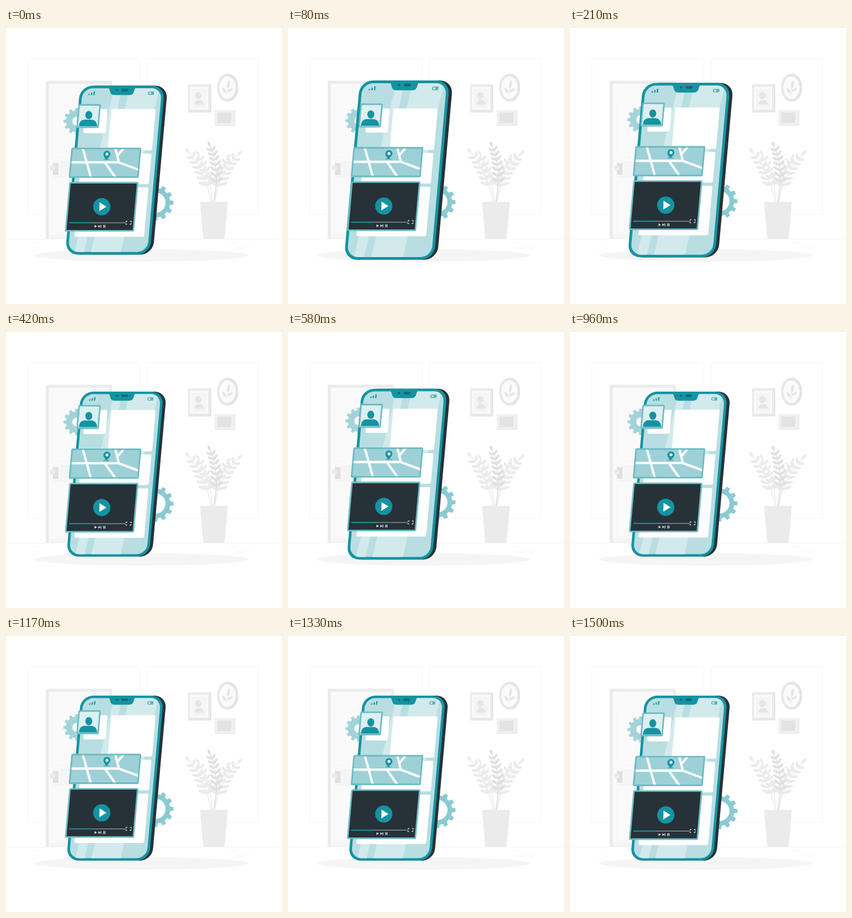
These frames come from a looping animation (500 by 500 pixels, 1.54 s). An HTML page:

```html
<!DOCTYPE html>
<html lang="en">
<head>
<meta charset="utf-8">
<title>Phone with floating panels</title>
<style>
html, body { margin: 0; width: 100%; height: 100%; overflow: hidden; background: #fff; }
svg { display: block; width: 100vw; height: 100vh; }
</style>
</head>
<body>
<svg viewBox="0 0 500 500">
  <defs>
    <clipPath id="screen"><rect x="127.3" y="112.6" width="140.4" height="289.8" rx="18"/></clipPath>
    <clipPath id="mapArea"><rect x="116.3" y="218.2" width="124" height="52" rx="2"/></clipPath>
  </defs>

  <!-- room -->
  <g fill="#fff" stroke="#f5f5f5">
    <rect x="39.5" y="55.5" width="203" height="282" rx="3"/>
    <rect x="255.5" y="55.5" width="202" height="282" rx="3"/>
    <path d="M0 382.5H500M401 389.5h15M417 398.5h31M52 389.5h10"/>
  </g>
  <path d="M72 95.500H192V382H72Z" fill="#ebebeb"/>
  <path d="M77 100.500H187V382H77Z" fill="#f5f5f5"/>
  <path d="M78 101H186V375H78Z" fill="#fafafa"/>
  <path d="M85 132v-10q0-14 14-14h66q14 0 14 14v10ZM85 138h94v96h-94ZM85 276h94v98h-94Z" fill="#fafafa" stroke="#f5f5f5"/>
  <path d="M85 241H180V272H85Z" fill="#f5f5f5"/>
  <path d="M85 245H95V266H85Z" fill="#e0e0e0"/>
  <rect x="79.500" y="249" width="10" height="9" rx="4" fill="#ebebeb"/>
  <ellipse cx="245.5" cy="412" rx="193.500" ry="11.300" fill="#f5f5f5"/>

  <!-- pictures -->
  <path d="M330 102H372V153H330Z" fill="#e6e6e6"/>
  <path d="M330 102H369.500V150.500H330Z" fill="#ebebeb"/>
  <path d="M333.500 106.500H366V147.500H333.500Z" fill="#fafafa"/>
  <path d="M337 110H363V144H337Z" fill="#f5f5f5"/>
  <path d="M341 139q1-8 9-9q8 1 9 9Z" fill="#e6e6e6"/>
  <ellipse cx="348.500" cy="122.500" rx="6" ry="6.500" fill="#e6e6e6"/>
  <ellipse cx="402.5" cy="108" rx="18" ry="25.300" fill="#e0e0e0"/>
  <ellipse cx="400.5" cy="108" rx="18" ry="25" fill="#e6e6e6"/>
  <ellipse cx="401" cy="108" rx="14.800" ry="20.500" fill="#fafafa"/>
  <g fill="#e6e6e6">
    <ellipse cx="403" cy="102" rx="2.600" ry="7" transform="rotate(8 403 102)"/>
    <ellipse cx="395.5" cy="113" rx="2.400" ry="5.500" transform="rotate(-35 395.5 113)"/>
    <ellipse cx="406" cy="112.5" rx="2.400" ry="5.500" transform="rotate(55 406 112.5)"/>
    <path d="M400 121L403 102" stroke="#e6e6e6"/>
  </g>
  <path d="M378 149H415.500V177H378Z" fill="#ebebeb"/>
  <path d="M378 149H413V175H378Z" fill="#f0f0f0"/>
  <path d="M383 153H408V172H383Z" fill="#e3e3e3"/>

  <g id="plant"></g>
  <path d="M351.500 315H402L396 382H357.500Z" fill="#ebebeb"/>

  <g class="float" id="gears"></g>

  <g id="phone">
    <g transform="matrix(1 0 -.089 1 22.900 0)">
      <rect x="128" y="108" width="149.800" height="299" rx="22" fill="#263238"/>
      <rect x="122.600" y="108" width="149.800" height="299" rx="22" fill="#1593a1"/>
      <rect x="127.300" y="112.600" width="140.400" height="289.800" rx="18" fill="#b8dee2"/>
      <g clip-path="url(#screen)" fill="#d2eaec">
        <path d="M184 108H198L155 407H138ZM211 108H264L220 407H167Z"/>
      </g>
    </g>
    <path d="M184 110H236Q232.500 112 231.500 117Q230 124.500 223 124.500H196.500Q189.500 124.500 188.500 117Q187.500 112 184 110Z" fill="#1593a1"/>
    <g fill="#0e6c78">
      <circle cx="201" cy="115.600" r="2.100"/>
      <rect x="209" y="113.300" width="12" height="4.600" rx="2.300"/>
      <path d="M150.800 122h2.200l-.2 2.500h-2.200ZM155.300 120.200h2.200l-.4 4.300h-2.200ZM159.900 118h2.200l-.6 6.500h-2.200Z" fill="#1593a1"/>
    </g>
    <path d="M258 118.300H267L266.400 124.200H257.500Q255.500 124 255.800 121.200Q256 118.500 258 118.300Z" fill="#5bb0b9"/>
    <rect x="257.800" y="119.600" width="3.800" height="3.300" rx="1" fill="#d2eaec"/>
  </g>

  <g class="float">
    <g transform="matrix(1 0 -.089 1 22.900 0)">
      <g fill="#fff">
        <rect x="181" y="147.300" width="80.500" height="75" rx="3"/>
        <rect x="134" y="147.300" width="40.500" height="43.700" rx="3"/>
        <rect x="134.500" y="227.800" width="126.500" height="55.500" rx="3"/>
        <rect x="134.500" y="289.300" width="126.500" height="89.500" rx="3"/>
      </g>
      <g stroke="#6dbbc4" stroke-width="2.800">
        <rect x="122" y="139.800" width="38" height="40.600" rx="1.500" fill="#dceff1"/>
        <rect x="116.300" y="218.600" width="124" height="52" rx="1.500" fill="#9ed1d7"/>
        <rect x="118" y="280.800" width="122.600" height="87.200" rx="1.500" fill="#263238"/>
      </g>
      <g clip-path="url(#mapArea)" transform="translate(0 .4)">
        <path transform="matrix(1 0 .089 1 -22.900 0)" d="M138 214L155 275M112 243.500H204L246 259M197 214L204.500 243.500M214 217L201.500 232M179 243.500L200 273" fill="none" stroke="#fff" stroke-width="4.200"/>
        <rect x="116.300" y="218.200" width="124" height="52" rx="1.500" fill="none" stroke="#6dbbc4" stroke-width="2.800"/>
      </g>
    </g>
    <g fill="#1593a1">
      <path d="M132 178.500Q133 166.500 143 166.500H154Q164 166.500 165.200 178.500Z"/>
      <ellipse cx="150" cy="158.200" rx="6.300" ry="7.400"/>
      <ellipse cx="182" cy="238.700" rx="6" ry="1.200" fill="#5fa9b2"/>
      <path d="M181.700 239Q176.300 233 176.500 229.200A6.400 6.400 0 0 1 189.300 229.200Q188.800 233 181.700 239Z"/>
      <circle cx="183" cy="229" r="2.700" fill="#fff"/>
      <circle cx="173.500" cy="324.200" r="15.600"/>
    </g>
    <path d="M169.500 316.200L182 324.200L169 332.200Z" fill="#fff"/>
    <path d="M155 353.400H216" stroke="#b5b9bc"/>
    <path d="M114.500 353.400H155" stroke="#1593a1" stroke-width="2"/>
    <path d="M217.500 352.500v-2h2.500M224.500 350.500h2.500v2M226.500 354v2h-2.500M219.500 356h-2.500v-2" fill="none" stroke="#fff"/>
    <path d="M160.500 357.300L164.800 359.800L160.300 362.300ZM167.500 357.300L171 359.800L167.300 362.300ZM171.300 357.300h1.200v5h-1.200ZM176.300 357.300h1.400v5h-1.400ZM178.700 357.300h1.400v5h-1.400Z" fill="#e0e3e4"/>
  </g>
</svg>

<script>
const $ = id => document.getElementById(id);

function gear(cx, cy, r, root, hole, teeth, color) {
  const step = 2 * Math.PI / teeth;
  const points = [];
  for (let i = 0; i < teeth; i++) {
    for (const [offset, radius] of [[-.29, root], [-.2, r], [.2, r], [.29, root]]) {
      const a = (i + offset) * step;
      points.push((cx + radius * Math.cos(a)).toFixed(1) + ' ' + (cy + radius * Math.sin(a)).toFixed(1));
    }
  }
  const ring = `M${cx - hole} ${cy}a${hole} ${hole} 0 1 0 ${2 * hole} 0a${hole} ${hole} 0 1 0 ${-2 * hole} 0Z`;
  return `<path fill="${color}" fill-rule="evenodd" d="M${points.join('L')}Z${ring}"/>`;
}

// Quadratic stem from base to tip with paired leaflets along its upper part
function frond([x0, y0], [x1, y1], [x2, y2], pairs, size, color) {
  let leaves = '';
  for (let i = 0; i <= pairs; i++) {
    const t = .3 + .67 * i / pairs, u = 1 - t;
    const x = u * u * x0 + 2 * u * t * x1 + t * t * x2;
    const y = u * u * y0 + 2 * u * t * y1 + t * t * y2;
    const angle = Math.atan2(u * (y1 - y0) + t * (y2 - y1), u * (x1 - x0) + t * (x2 - x1)) * 180 / Math.PI;
    const length = size * (1 - .35 * i / pairs);
    for (const turn of i === pairs ? [0] : [-52, 52])
      leaves += `<ellipse cx="${length}" rx="${length}" ry="${size * .32}" transform="translate(${x} ${y}) rotate(${angle + turn})"/>`;
  }
  return `<g fill="${color}"><path d="M${x0} ${y0}Q${x1} ${y1} ${x2} ${y2}" fill="none" stroke="${color}" stroke-width="1.6"/>${leaves}</g>`;
}

$('gears').innerHTML =
  gear(128, 169.4, 24, 19.5, 8, 12, '#a3d3d9') +
  gear(270.5, 317, 33, 27, 18.5, 12, '#8acad1');

$('plant').innerHTML =
  frond([372, 316], [362, 262], [330, 224], 6, 8.5, '#ebebeb') +
  frond([374, 316], [368, 260], [348, 228], 5, 6.5, '#ebebeb') +
  frond([378, 316], [386, 262], [422, 228], 6, 8.5, '#ebebeb') +
  frond([376, 316], [382, 265], [402, 234], 5, 6.5, '#ebebeb') +
  frond([377, 316], [388, 252], [369, 212], 7, 7.5, '#e0e0e0');

// CSS "ease": cubic-bezier(.25, .1, .25, 1)
function ease(x) {
  const bezier = (u, a, b) => 3 * u * (1 - u) * (a * (1 - u) + b * u) + u ** 3;
  let low = 0, high = 1;
  for (let i = 0; i < 20; i++) {
    const mid = (low + high) / 2;
    if (bezier(mid, .25, .25) < x) low = mid; else high = mid;
  }
  return bezier(low, .1, 1);
}

function pulse(t, start, rise) {
  const p = (t - start) / rise;
  if (p < 0 || p > 2) return 0;
  return p < 1 ? ease(p) : 1 - ease(p - 1);
}

const LOOP = 1540;
const floating = document.querySelectorAll('.float');

function draw() {
  const t = performance.now() % LOOP;
  const scale = 1 + .1 * (pulse(t, -32, 193) + pulse(t, 540, 181));
  const lift = -10 * (1 - Math.abs(Math.min(t + 40, 1500) / 750 - 1));
  $('phone').setAttribute('transform', `translate(200 257.5) scale(${scale}) translate(-200 -257.5)`);
  floating.forEach(g => g.setAttribute('transform', `translate(0 ${lift})`));
  requestAnimationFrame(draw);
}
draw();
</script>
</body>
</html>
```
